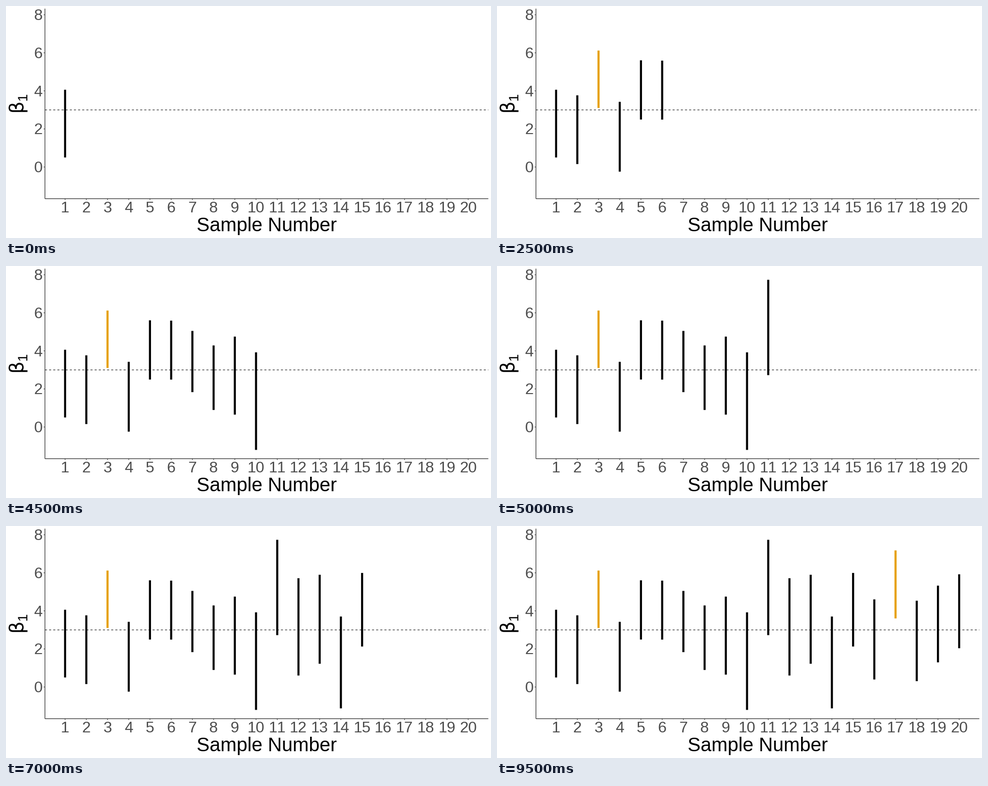
A matplotlib script for the animation above (10000 ms loop, 1000 px wide and 480 px high).

```python
import matplotlib.pyplot as plt
import numpy as np
from matplotlib.animation import FuncAnimation
from matplotlib.patches import PathPatch
from matplotlib.textpath import TextPath
from matplotlib.transforms import Affine2D

plt.rcParams["text.kerning_factor"] = 6  # evenly spaced digits

W, H = 1000, 480
PX = 0.72  # points per pixel at 100 dpi
LEFT, RIGHT, TOP, BOTTOM = 80.3, 994.5, 5.5, 398.7
STEP = (RIGHT - LEFT) / 20.9
LINE, BAR, TICK, GAP = 1.067, 4.268, 2.75, 4.95
DIGIT = 18  # digit advance of the tick labels
DARK, GREY, ORANGE = "#333333", "#4D4D4D", "#E69F00"

TRUTH = 3
ESTIMATES = [2.28, 1.96, 4.61, 1.59, 4.05, 4.04, 3.44, 2.59, 2.70, 1.36,
             5.23, 3.16, 3.56, 1.29, 4.06, 2.50, 5.39, 2.42, 3.31, 3.98]


def margin(n, est):
    """Half-width: peaks mid-run and shrinks as the estimate grows."""
    base = np.interp(n, [1, 8, 11, 15, 20], [1.7, 1.65, 2.75, 2.05, 2.05])
    return base - 0.11 * (est - TRUTH)


def x_pos(n):
    return LEFT + (n - 0.05) * STEP


def y_pos(v):
    return 333.1 - 39.375 * v


fig = plt.figure(figsize=(W / 100, H / 100), dpi=100, facecolor="white")
ax = fig.add_axes([0, 0, 1, 1])
ax.set(xlim=(0, W), ylim=(H, 0))
ax.axis("off")


def line(x0, y0, x1, y1, color="black", width=LINE, **kw):
    return ax.plot([x0, x1], [y0, y1], color=color, lw=width * PX,
                   solid_capstyle="butt", dash_capstyle="butt",
                   snap=False, **kw)[0]


def label(x, y, text, size=32, color=GREY, ha="left"):
    ax.text(x, y, text, family="Liberation Sans", size=size * PX,
            color=color, ha=ha, va="baseline")


def upright(x, y, text, size, family):
    path = TextPath((0, 0), text, size=size, prop={"family": family})
    turn = Affine2D().scale(1, -1).rotate_deg(-90).translate(x, y)
    ax.add_patch(PathPatch(turn.transform_path(path), fc="black", lw=0))


# Reference line and axes
line(LEFT, y_pos(TRUTH), RIGHT, y_pos(TRUTH), ls=(0, (4, 4)))
line(LEFT, TOP, LEFT, BOTTOM)
line(LEFT, BOTTOM, RIGHT, BOTTOM)

for v in range(0, 9, 2):
    y = y_pos(v)
    line(LEFT - TICK, y, LEFT, y, DARK)
    label(LEFT - GAP - DIGIT, y + 11, str(v))

bars = []
for n, est in enumerate(ESTIMATES, 1):
    x, text = x_pos(n), str(n)
    line(x, BOTTOM, x, BOTTOM + TICK, DARK)
    label(x - DIGIT * len(text) / 2, 427, text)

    m = margin(n, est)
    color = ORANGE if est - m > TRUTH else "black"
    bars.append(line(x, y_pos(est + m), x, y_pos(est - m), color, BAR))

label((LEFT + RIGHT) / 2, 466, "Sample Number", 40, "black", "center")
upright(36, 223, "β", 40, "DejaVu Sans")
upright(44, 198, "1", 28, "Liberation Sans")


def update(i):
    for k, bar in enumerate(bars):
        bar.set_visible(k <= i)
    return bars


anim = FuncAnimation(fig, update, frames=len(bars), interval=500,
                     repeat=True, repeat_delay=0, blit=False)
plt.show()
```
